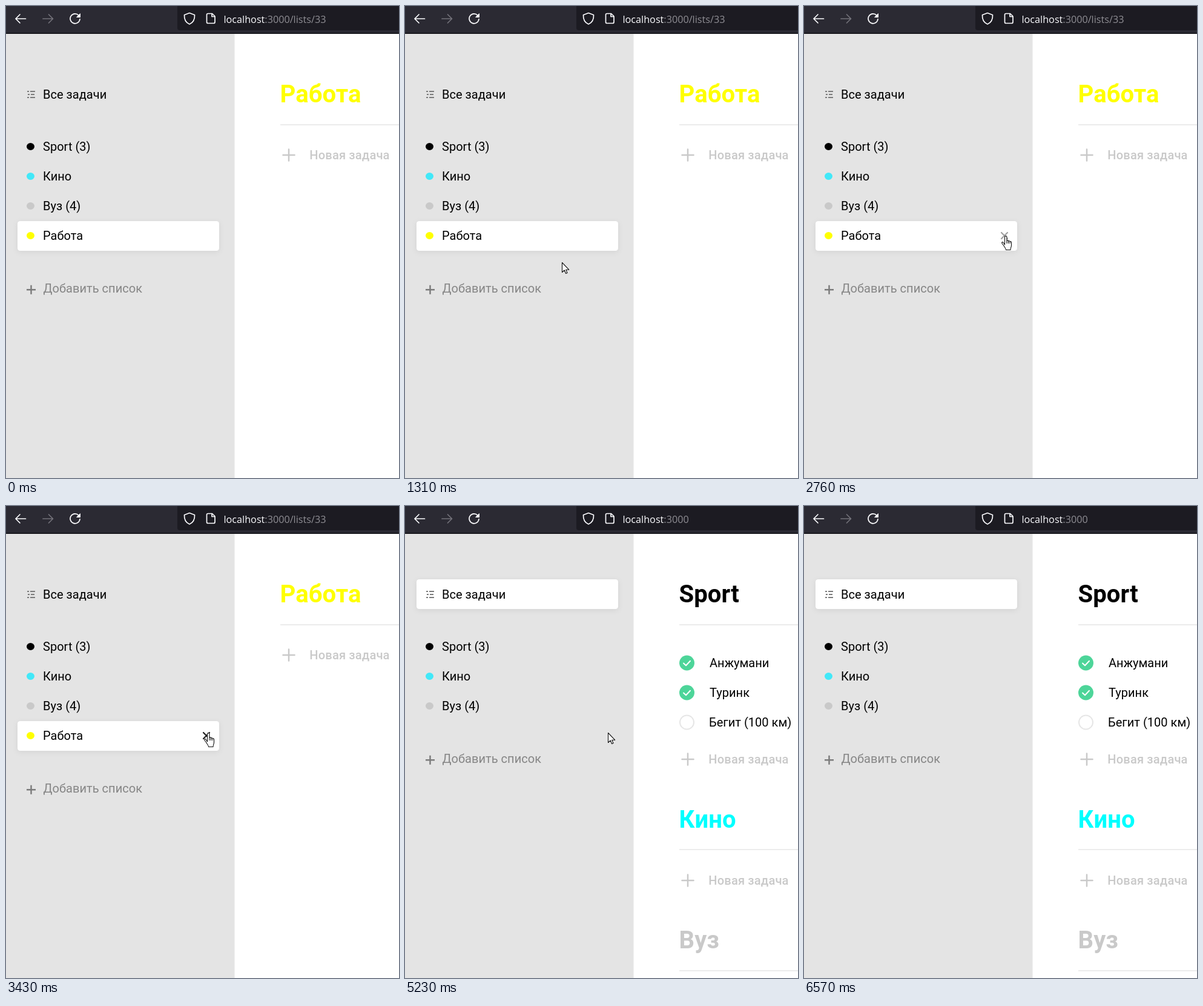
Recreate the animation shown at these times as an HTML page. Size 649 by 779 pixels, loop 6.9 s.

```html
<!DOCTYPE html>
<html lang="ru">
<head>
<meta charset="utf-8">
<title>Список задач</title>
<style>
  html, body { margin: 0; width: 100%; height: 100%; overflow: hidden; background: #fff; }
  svg { display: block; }
  text { font: 20px Roboto, sans-serif; letter-spacing: .03px; white-space: pre; }
  .title { font-size: 40px; font-weight: 700; letter-spacing: .1px; }
  .new { font-weight: 500; letter-spacing: .19px; fill: #c9c9c9; }
  .url { font: 16.2px "Open Sans", sans-serif; letter-spacing: 0; fill: #8f8e94; }
  .host { fill: #fbfbfe; }
  .line { fill: none; stroke-linecap: round; stroke-linejoin: round; }
  .rule { stroke: #ececec; stroke-width: 1.8; }
  .card { fill: #fff; filter: drop-shadow(0 2px 5px rgba(0, 0, 0, .07)); }
</style>
</head>
<body>
<svg width="649" height="779" viewBox="0 0 649 779">
  <defs>
    <g id="newTask">
      <path d="M457.5 0h19M467-9.5v19" class="line" stroke="#c9c9c9" stroke-width="2.5"/>
      <text x="501.3" y="7" class="new">Новая задача</text>
    </g>
    <g id="addList">
      <path d="M34 2.3h15M41.5-5.2v15" stroke="#7c7c7c" stroke-width="2.5"/>
      <text x="61.5" y="7" fill="#868686">Добавить список</text>
    </g>
    <g id="done">
      <circle cx="465.5" r="12.5" fill="#4dd599"/>
      <path d="M460 .5l4 3.8 7-7.6" class="line" stroke="#fff" stroke-width="2"/>
    </g>
    <ellipse id="dot" cx="40.5" rx="6.5" ry="6"/>
  </defs>

  <rect width="378" height="779" fill="#e4e4e4"/>
  <path d="M377.5 46V779" stroke="#f1f1f1"/>

  <!-- browser bar -->
  <rect width="649" height="46" fill="#2b2a33"/>
  <rect y="44.5" width="649" height="1.5" fill="#0f0e14"/>
  <path d="M283 0H649V40H287a4 4 0 0 1-4-4Z" fill="#1c1b22"/>
  <g class="line" stroke="#fbfbfe" stroke-width="1.7">
    <path d="M32.5 21H16M23 14l-7 7 7 7"/>
    <path d="M61 21H77.5M70.5 14l7 7-7 7" stroke="#73727a"/>
    <path d="M120 15.5A8 8 0 1 0 122 21.5"/>
    <path d="M122.5 13v5.5H117Z" fill="#fbfbfe" stroke-width="1"/>
    <path d="M303 11.500l8.500 3.200c.3 6-1 12-8.500 15.300-7.500-3.300-8.800-9.300-8.500-15.300Z"/>
    <path d="M333.5 12.5h7l4.500 4.500v9.500a2 2 0 0 1-2 2h-9.500a2 2 0 0 1-2-2v-12a2 2 0 0 1 2-2ZM340 13v4.500h4.500"/>
  </g>
  <text x="359.5" y="27.5" class="url"><tspan class="host">localhost</tspan>:3000<tspan id="route">/lists/33</tspan></text>

  <!-- sidebar -->
  <rect id="card" x="19" width="333" height="49" rx="4.5" class="card"/>
  <path d="M35 141h3m2 0h8M36 146h3m2 0h6M35 151h3m2 0h8" stroke="#7c7c7c" stroke-width="2"/>
  <text x="61" y="153">Все задачи</text>
  <use href="#dot" y="232"/>
  <text x="61" y="239">Sport (3)</text>
  <use href="#dot" y="281" fill="#42e8f8"/>
  <text x="61" y="288">Кино</text>
  <use href="#dot" y="330" fill="#c9c9c9"/>
  <text x="61" y="337">Вуз (4)</text>
  <path d="M453 196H649" class="rule"/>

  <g id="listPage">
    <use href="#dot" y="379" fill="#ff0"/>
    <text x="61" y="386">Работа</text>
    <path id="remove" d="M326 374l10 10m0-10l-10 10" class="line" stroke-width="2.2"/>
    <use href="#addList" y="466"/>
    <text x="452.5" y="159" class="title" fill="#ff0">Работа</text>
    <use href="#newTask" y="246"/>
  </g>

  <g id="allPage">
    <use href="#addList" y="417"/>
    <text x="452.5" y="159" class="title">Sport</text>
    <use href="#done" y="259"/>
    <text x="503" y="266">Анжумани</text>
    <use href="#done" y="308"/>
    <text x="503" y="315">Туринк</text>
    <circle cx="465.5" cy="357" r="11.5" fill="#fff" stroke="#e6e6e6" stroke-width="2"/>
    <text x="502" y="364">Бегит (100 км)</text>
    <use href="#newTask" y="418"/>
    <text x="452.5" y="531" class="title" fill="#0ff">Кино</text>
    <use href="#newTask" y="618"/>
    <text x="452.5" y="730" class="title" fill="#c9c9c9">Вуз</text>
    <path d="M453 567H649M453 767H649" class="rule"/>
  </g>

  <g id="pointer" fill="#fff" stroke="#111" stroke-width="1.1" stroke-linejoin="round">
    <path id="arrow" d="M.5.5V16.5L4.2 13l2.4 5.5 2.4-1-2.3-5.3h5Z"/>
    <path id="hand" transform="translate(-6)" d="M5.5 15V2.3a1.7 1.7 0 0 1 3.4 0V8.500c.6-1 2.4-.8 2.6.6.8-.8 2.3-.4 2.5.8 1-.7 2.5 0 2.5 1.6V16c0 3-1.5 4-1.5 7.5H7.500c0-2.5-2.500-4.500-4-7.500L.8 12.500C.2 11 1.800 10 3 11.200ZM8.900 8.500V13M11.500 9.500V13M14 10.500V13"/>
  </g>
</svg>
<script>
  const LOOP = 6900, STEP = 70, DELETED = 3500;
  // pointer path: time, x, y
  const path = [
    [330, 475, 764], [610, 318, 684], [890, 257, 505], [960, 257, 478],
    [1240, 257, 432], [1450, 264, 406], [1660, 290, 385],
    [2010, 319, 380], [2360, 332, 380], [2690, 332, 380], [2900, 333, 374],
    [3430, 333, 374], [3500, 332, 374], [5160, 332, 374], [5230, 335, 374],
    [5510, 358, 400], [5860, 394, 455], [6210, 490, 590], [6500, 621, 764], [6560, 640, 785]
  ];
  const el = id => document.getElementById(id);
  const show = (id, on) => el(id).style.display = on ? '' : 'none';

  function pointAt(t) {
    const i = path.findIndex(p => p[0] >= t);
    if (i < 1) return path[i < 0 ? path.length - 1 : 0].slice(1);
    const [t0, x0, y0] = path[i - 1], [t1, x1, y1] = path[i];
    const k = (t - t0) / (t1 - t0);
    return [x0 + (x1 - x0) * k, y0 + (y1 - y0) * k].map(Math.round);
  }

  function draw(now) {
    const t = now % LOOP;
    const tick = 50 + Math.floor((t - 50) / STEP) * STEP;
    const [x, y] = pointAt(tick);
    const deleted = t >= DELETED;
    const inRow = top => x < 352 && y >= top && y < top + 49;
    const onItem = !deleted && inRow(355);
    const overHand = onItem || !deleted && inRow(442);

    show('listPage', !deleted);
    show('allPage', deleted);
    show('route', !deleted);
    el('card').setAttribute('y', deleted ? 121 : 355);

    const dark = Math.min(1, Math.max(0, (tick - 2690) / 210));
    const shade = Math.round(175 - 145 * dark);
    el('remove').setAttribute('stroke', `rgb(${shade},${shade},${shade})`);
    show('remove', onItem);

    show('pointer', t >= 330 && t < 6570);
    show('arrow', !overHand);
    show('hand', overHand);
    el('pointer').setAttribute('transform', `translate(${x} ${y})`);
    requestAnimationFrame(frame);
  }

  const start = performance.now();
  const frame = () => draw(performance.now() - start);
  frame();
</script>
</body>
</html>
```
